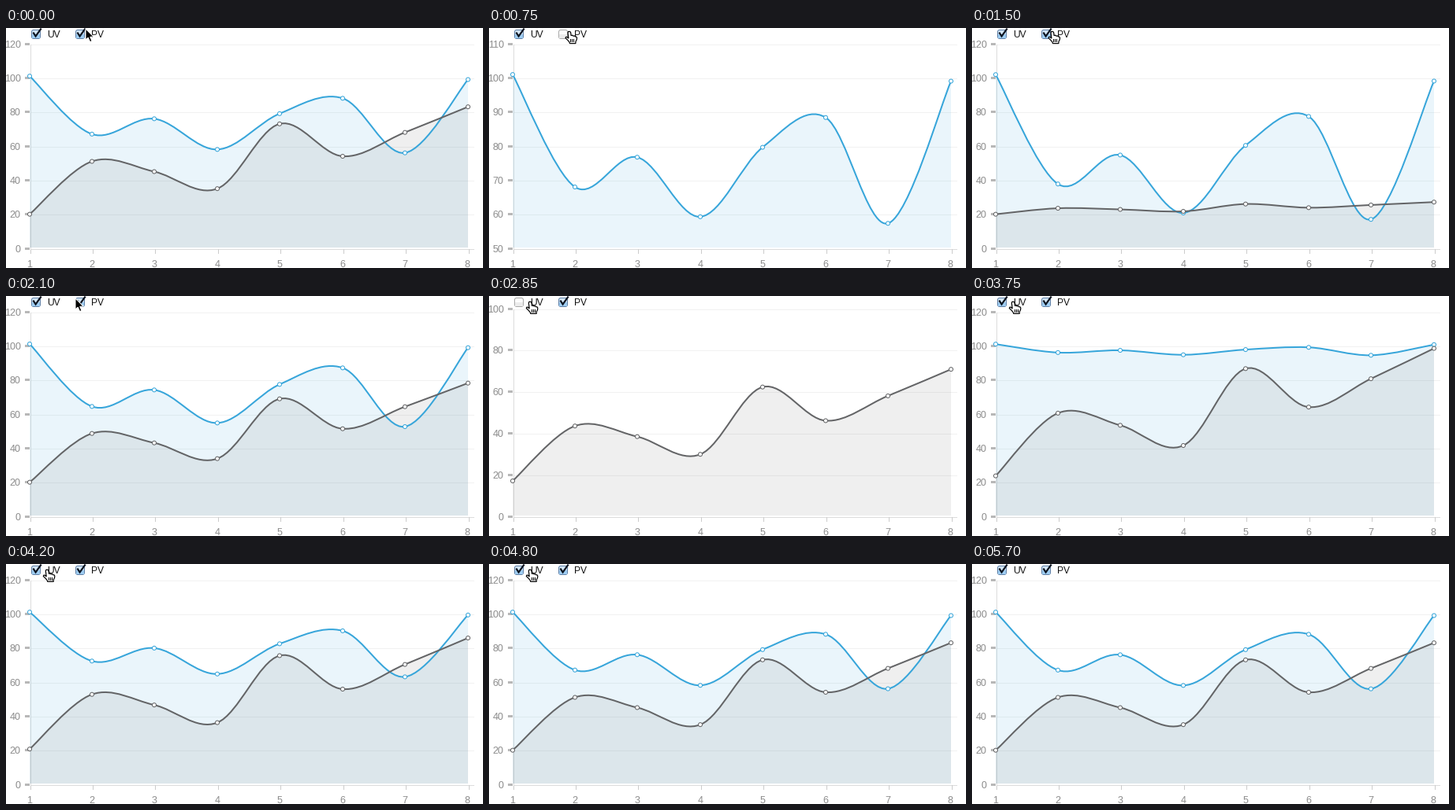
These frames come from a looping animation (605 px wide and 305 px high, 6.14 s). A matplotlib script:

```python
import numpy as np
import matplotlib.pyplot as plt
from matplotlib.animation import FuncAnimation
from matplotlib.patches import Circle, FancyBboxPatch, PathPatch, Polygon, Rectangle
from matplotlib.path import Path

W, H, DPI = 605, 305, 100
LOOP, INTERVAL, TICK = 6140, 20, 150
PX = 72 / DPI
LEFT, RIGHT, BASE = 30, 592, 280
EASE_MS = 1353

XS = LEFT + np.floor(np.arange(8) * 556 / 7)
DATA = {
    "UV": np.array([101, 67, 76, 58, 79, 88, 56, 99]),
    "PV": np.array([20, 51, 45, 35, 73, 54, 68, 83]),
}
COLORS = {"UV": "#36a5da", "PV": "#636466"}
BOX_X = {"UV": 32, "PV": 88}

# scale: low value, high value, step, top pixel
BOTH = (0, 120, 20, 20)
UV_ONLY = (50, 110, 10, 20)
PV_ONLY = (0, 100, 20, 16)
# phase: start in ms, scale, visible series
PHASES = [
    (-3000, BOTH, "UV PV"),
    (67, UV_ONLY, "UV"),
    (1460, BOTH, "UV PV"),
    (2785, PV_ONLY, "PV"),
    (3698, BOTH, "UV PV"),
]

fig = plt.figure(figsize=(W / DPI, H / DPI), dpi=DPI, facecolor="white")
ax = fig.add_axes([0, 0, 1, 1])
ax.set_xlim(0, W)
ax.set_ylim(H, 0)
ax.axis("off")


def line(xs, ys, color, width=1, z=1, **kw):
    return ax.plot(xs, ys, color=color, lw=width * PX, zorder=z, **kw)[0]


def rule(x0, y0, x1, y1, color, z=1):
    """Thin straight line through pixel centres."""
    return line([x0 + 0.5, x1 + 0.5], [y0 + 0.5, y1 + 0.5], color, z=z)


def label(x, y, s, color="#8c8c8c", ha="center", size=12.5, z=5):
    return ax.text(x, y, s, color=color, ha=ha, va="baseline", zorder=z,
                   family="Liberation Sans", fontsize=size * PX)


def to_y(values, scale):
    low, high, _, top = scale
    return BASE - (values - low) * (BASE - top) / (high - low)


def make_scale(scale):
    low, high, step, top = scale
    parts = [rule(LEFT, top, LEFT, BASE, "#dcdcdc")]
    for v in range(low, high + 1, step):
        y = int(to_y(v, scale) + 1e-6)
        if v > low:
            parts.append(rule(LEFT, y, RIGHT, y, "#f1f1f1", z=0.5))
        parts.append(ax.add_patch(Rectangle((24, y - 1), 6, 3,
                                            fc="#b8b8b8", lw=0, zorder=1)))
        parts.append(label(18.7, y + 4.6, str(v), ha="right"))
    return parts


def make_checkbox(name):
    """Return the artists for the checked and the unchecked look."""
    x = BOX_X[name]
    looks = []
    for edge, upper, lower in (("#5f7fa6", "#d3e6f6", "#9fcdf2"),
                               ("#a9a9a9", "#fdfdfd", "#ececec")):
        box = FancyBboxPatch((x + 2.5, 4.5), 7, 7, fc=upper, ec=edge, lw=PX,
                             zorder=6, boxstyle="round,pad=2,rounding_size=2.5")
        half = Rectangle((x + 1, 8), 10, 5, fc=lower, lw=0, zorder=6.1)
        looks.append([ax.add_patch(box), ax.add_patch(half)])
    looks[0].append(line([x + 3, x + 5.6, x + 12], [6.5, 10.5, 1.5], "#0c1420",
                         2.2, z=6.2, solid_joinstyle="miter"))
    label(x + 20, 12, name, "#111111", "left", 12, 6)
    return looks


def show(parts, on):
    for p in parts:
        p.set_visible(on)


def curve(ys):
    """Catmull-Rom spline through the points as Bezier vertices and codes."""
    pts = np.column_stack([XS, ys])
    ext = np.vstack([pts[:1], pts, pts[-1:]])
    slope = (ext[2:] - ext[:-2]) / 6
    verts = [pts[0]]
    for i in range(len(pts) - 1):
        verts += [pts[i] + slope[i], pts[i + 1] - slope[i + 1], pts[i + 1]]
    return verts, [Path.MOVETO] + [Path.CURVE4] * (len(verts) - 1)


class Series:
    def __init__(self, name, z):
        color = COLORS[name]
        empty = Path([(0, 0), (0, 0)])
        self.area = ax.add_patch(PathPatch(empty, fc=color, alpha=0.1, lw=0, zorder=z))
        self.stroke = ax.add_patch(PathPatch(empty, fc="none", ec=color,
                                             lw=2 * PX, zorder=z + 1))
        self.dots = [ax.add_patch(Circle((x, 0), 2.5, fc="white", ec=color,
                                         lw=PX, zorder=z + 1.1)) for x in XS]
        self.parts = [self.area, self.stroke] + self.dots

    def place(self, ys):
        verts, codes = curve(ys)
        self.stroke.set_path(Path(verts, codes))
        floor = [(XS[-1], BASE - 1), (XS[0], BASE - 1), verts[0]]
        self.area.set_path(Path(verts + floor,
                                codes + [Path.LINETO] * 2 + [Path.CLOSEPOLY]))
        for dot, x, y in zip(self.dots, XS, ys):
            dot.center = (x, y)


ARROW = np.array([(0, 0), (0, 14), (3.2, 11.2), (5.6, 16.6), (8, 15.6),
                  (5.7, 10.4), (10, 10)])
HAND = np.array([(-2, -0.5), (0, -0.5), (1, 1), (1.4, 4.6), (3.2, 4.2),
                 (4.2, 5.2), (5.8, 5), (6.8, 6), (8.2, 6.2), (8.8, 7.4),
                 (8.6, 9.6), (7.2, 12.4), (7.2, 14.6), (-0.3, 14.6),
                 (-0.8, 12.8), (-3.3, 10), (-5.6, 7.8), (-5.2, 6.4),
                 (-3.8, 6.4), (-1.8, 8.2), (-2.7, 1)])
arrow = ax.add_patch(Polygon(ARROW, fc="black", ec="white", lw=PX, zorder=9))
hand = ax.add_patch(Polygon(HAND, fc="white", ec="black", lw=1.2 * PX, zorder=9))
folds = [line([0, 0], [0, 0], "black", z=9.1) for _ in range(3)]


def move_pointer(t):
    keys = [0, 150, 1500, 2100, 2700]
    x = np.interp(t, keys, [101, 102.7, 102.7, 88, 53])
    y = np.interp(t, keys, [1, 5, 5, 3, 7.8])
    over_label = 48 <= x <= 70 or x > 101.5
    shown = t < 5700
    is_hand = shown and over_label and t < 5550
    show([arrow], shown and not is_hand)
    show([hand] + folds, is_hand)
    arrow.set_xy(ARROW + (x, y))
    hand.set_xy(HAND + (x, y))
    for i, fold in enumerate(folds):
        fx = x + 0.7 + 2 * i
        fold.set_data([fx, fx], [y + 8.7, y + 12])


rule(LEFT, BASE, RIGHT, BASE, "#dcdcdc")
for i, tick_x in enumerate(XS):
    rule(tick_x, BASE, tick_x, BASE + 5, "#cccccc")
    label(tick_x - (1.5 if i == 7 else 0), 304, str(i + 1))

scales = {s: make_scale(s) for s in (BOTH, UV_ONLY, PV_ONLY)}
boxes = {n: make_checkbox(n) for n in DATA}
series = {"UV": Series("UV", 2), "PV": Series("PV", 2.5)}


def update(frame):
    t = (frame * INTERVAL + INTERVAL // 2) // TICK * TICK
    t = min(t, 5700)
    k = max(i for i, p in enumerate(PHASES) if p[0] <= t)
    start, scale, names = PHASES[k]
    left = (1 - min((t - start) / EASE_MS, 1)) ** 4

    for s, parts in scales.items():
        show(parts, s == scale)
    for name, item in series.items():
        on = name in names
        show(item.parts, on)
        show(boxes[name][0], on)
        show(boxes[name][1], not on)
        if not on:
            continue
        end = to_y(DATA[name], scale)
        # a series that was hidden grows out of a flat line
        begin = np.full(8, end[0])
        if k and name in PHASES[k - 1][2]:
            begin = to_y(DATA[name], PHASES[k - 1][1])
        item.place(end + (begin - end) * left)
    move_pointer(t)
    return []


anim = FuncAnimation(fig, update, frames=LOOP // INTERVAL, interval=INTERVAL,
                     init_func=lambda: update(0), repeat=True, blit=False)
plt.show()
```
